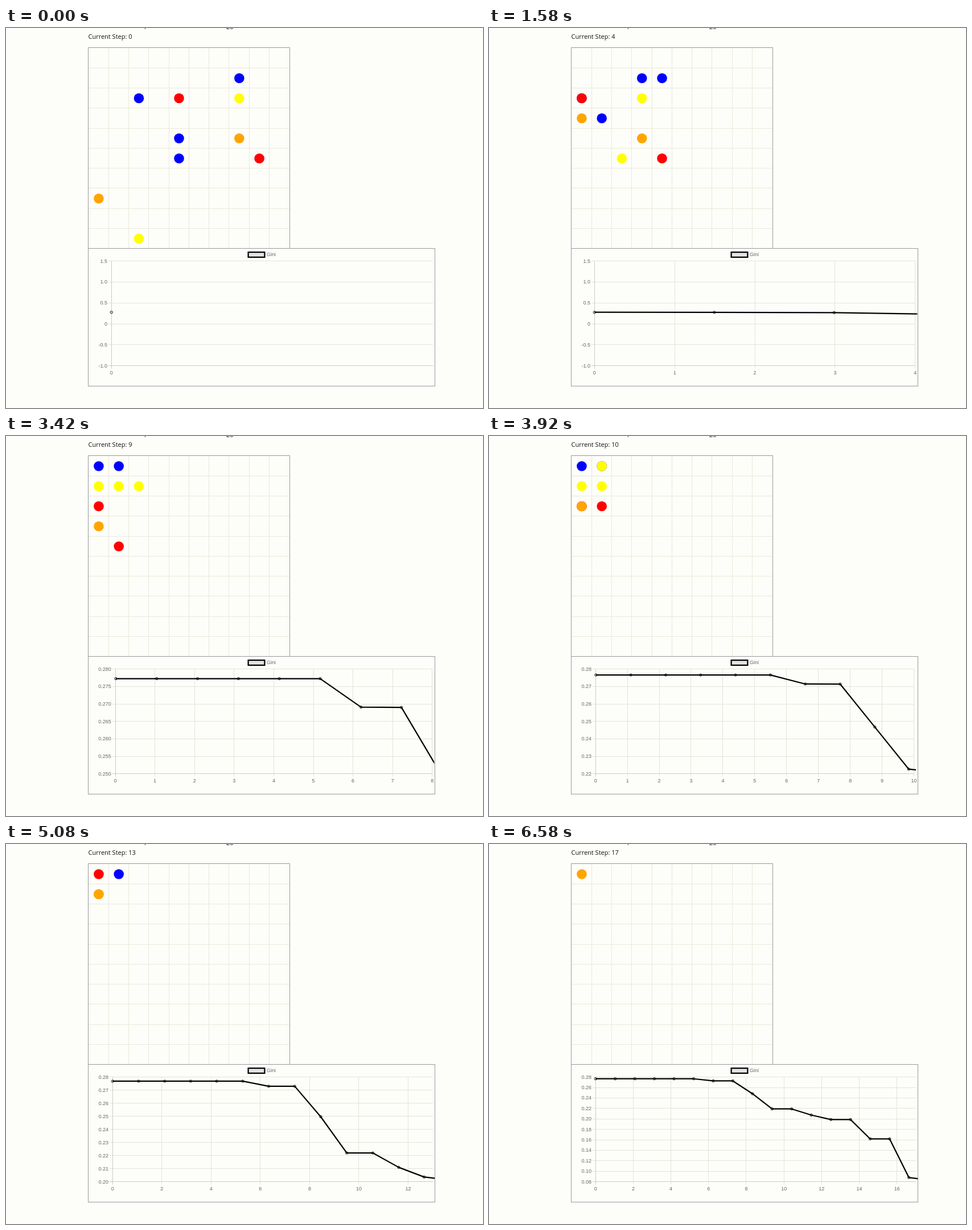
Write an HTML page with a canvas that moves like this. It is 838x668 px and loops after 6660 ms.

```html
<!DOCTYPE html>
<html>
<head>
<meta charset="utf-8">
<style>
  html, body { margin: 0; width: 100%; height: 100%; overflow: hidden; background: #fdfdf9; }
  canvas { display: block; }
</style>
</head>
<body>
<canvas id="stage" width="838" height="668"></canvas>
<script>
const ctx = document.getElementById('stage').getContext('2d');
const LOOP = 6660, FIRST = 420, STEP = 375, LAST = 17;
const DRAW_DELAY = 8, EASE_DELAY = 20, EASE_TIME = 1000;
const TOP = 409.7, BOTTOM = 593.7;

const gini = [.2769, .2769, .2769, .2769, .2769, .2769, .2731, .2731, .2502,
  .223, .223, .212, .204, .204, .1693, .1693, .0889, .0889];

// Cell (column, row) of each agent at the key steps; a shorter path leaves the board early.
const KEYS = [0, 4, 6, 8, 11, 14, 17];
const agents = [
  ['blue yellow', '22 02 12 11'],
  ['blue', '44 13 01'],
  ['blue', '71 31 11 00'],
  ['yellow', '72 32 12 01'],
  ['blue', '45 41 21 10 10'],
  ['orange', '07 03 02 02 02 01 00'],
  ['red', '42 02 02 02'],
  ['yellow', '29 25 23 21 00'],
  ['orange', '74 34 14 03 01'],
  ['red', '85 45 25 14 11 00']
].map(([colors, path]) => ({
  colors: colors.split(' '),
  path: path.split(' ').map(p => [+p[0], +p[1]])
}));

function line(x1, y1, x2, y2, color) {
  ctx.strokeStyle = color;
  ctx.lineWidth = 1;
  ctx.beginPath();
  ctx.moveTo(x1, y1);
  ctx.lineTo(x2, y2);
  ctx.stroke();
}

function text(str, x, y, align = 'left', font = '9px "Liberation Sans", Arial, sans-serif', color = '#666') {
  ctx.font = font;
  ctx.fillStyle = color;
  ctx.textAlign = align;
  ctx.fillText(str, x, y);
}

function niceCeil(range) {
  const unit = 10 ** Math.floor(Math.log10(range));
  return unit * [1, 2, 5, 10].find(m => range / unit <= m);
}

function axisFor(n) {
  const values = gini.slice(0, n + 1);
  let min = Math.min(...values), max = Math.max(...values);
  if (min === max) { min -= 1; max += 1.0001; }
  const tick = niceCeil(max - min) / 10;
  const first = Math.floor(min / tick), last = Math.ceil(max / tick);
  const digits = -Math.floor(Math.log10(tick) + 1e-9);
  const skip = n > 10 ? 2 : 1;
  const left = [0, 185.3, 187.2, 192, 197][digits];
  const right = n === 0 || n % skip ? 749.8 : n > 9 ? 746.5 : 748.8;
  const y = v => BOTTOM - (v / tick - first) / (last - first) * (BOTTOM - TOP);
  return { n, tick, first, last, digits, skip, left, right, y,
    gap: (right - left) / Math.max(n, 1), base: y(Math.max(first * tick, 0)) };
}

const axes = gini.map((_, n) => axisFor(n));

function moveTowards(points, axis, elapsed) {
  const rest = (1 - Math.max(0, elapsed - EASE_DELAY) / EASE_TIME) ** 4;
  return points.map(([x, y], i) => {
    const tx = axis.left + i * axis.gap, ty = axis.y(gini[i]);
    return [tx + (x - tx) * rest, ty + (y - ty) * rest];
  });
}

// Every step restarts the easing from wherever the points are.
function pointsAt(n, elapsed) {
  let points = [[axes[0].left, axes[0].y(gini[0])]];
  for (let k = 1; k <= n; k++) {
    const old = axes[k - 1];
    points.push([old.left + k * old.gap, old.base]);
    points = moveTowards(points, axes[k], k < n ? STEP : elapsed);
  }
  return points;
}

function drawBoard(step) {
  const cell = 35.27, x0 = 145.3, y0 = 35.3;
  for (let i = 1; i < 10; i++) {
    const p = Math.floor(i * cell) + .5;
    line(145 + p, 35, 145 + p, 387, '#eaeadc');
    line(145, 35 + p, 498, 35 + p, '#eaeadc');
  }
  ctx.strokeStyle = '#9a9aa2';
  ctx.strokeRect(144.5, 34.5, 354, 353);

  const k = KEYS.findLastIndex(key => key <= step);
  for (const { colors, path } of agents) {
    const from = path[k];
    if (!from) continue;
    const to = path[k + 1] || from;
    const f = (step - KEYS[k]) / ((KEYS[k + 1] || LAST + 1) - KEYS[k]);
    const [col, row] = from.map((a, i) => Math.round(a + (to[i] - a) * f));
    ctx.fillStyle = step > 6 ? colors[colors.length - 1] : colors[0];
    ctx.beginPath();
    ctx.arc(x0 + (col + .5) * cell, y0 + (row + .5) * cell, 8.8, 0, 7);
    ctx.fill();
  }
}

function drawChart(n, elapsed) {
  const axis = axes[n], { left, right } = axis;
  const soft = '#e4e4de', strong = '#cacac6';
  ctx.lineWidth = 1;
  ctx.strokeStyle = '#9a9aa2';
  ctx.strokeRect(144.5, 387.5, 609, 242);

  ctx.fillStyle = '#e3e3e1';
  ctx.fillRect(425.5, 394, 29, 9);
  ctx.strokeStyle = '#000';
  ctx.lineWidth = 2.25;
  ctx.strokeRect(425.6, 394.1, 28.8, 8.8);
  text('Gini', 458, 401);

  for (let i = axis.first; i <= axis.last; i++) {
    const y = axis.y(i * axis.tick), py = Math.floor(y) + .5;
    line(left - 5, py, right, py, i === axis.first ? strong : soft);
    text(i ? (i * axis.tick).toFixed(axis.digits) : '0', left - 7.2, y + 2.8, 'right');
  }
  for (let i = 0; i <= n; i += axis.skip) {
    const x = left + i * axis.gap, px = Math.floor(x) + .5;
    line(px, TOP, px, BOTTOM + 5, i ? soft : strong);
    text(i, x, 609, 'center');
  }

  const points = pointsAt(n, elapsed);
  ctx.save();
  ctx.beginPath();
  ctx.rect(left - 3.5, TOP - 3, right - left + 7, BOTTOM - TOP + 6);
  ctx.clip();
  ctx.strokeStyle = '#000';
  ctx.lineWidth = 2.25;
  ctx.lineJoin = 'round';
  ctx.beginPath();
  points.forEach(p => ctx.lineTo(...p));
  ctx.stroke();
  ctx.restore();

  ctx.fillStyle = 'rgba(0,0,0,.1)';
  ctx.strokeStyle = '#000';
  ctx.lineWidth = .8;
  for (const [x, y] of points) {
    if (x < left - 3 || x > right + 3) continue;
    ctx.beginPath();
    ctx.arc(x, y, 2.2, 0, 7);
    ctx.fill();
    ctx.stroke();
  }
}

// The picture advances twelve times a second: 80, 80, 90 ms.
function heldTime(t) {
  if (t < FIRST) return 0;
  const e = t - FIRST, rem = e % 250;
  return FIRST + e - rem + 80 * Math.min(2, Math.floor(rem / 80));
}

const stepAt = t => t < FIRST ? 0 : Math.min(LAST, Math.floor((t - FIRST) / STEP) + 1);

function draw(now) {
  const t = heldTime(now % LOOP);
  const label = '11px "Open Sans", "Noto Sans", sans-serif';
  ctx.fillStyle = '#fdfdf9';
  ctx.fillRect(0, 0, 838, 668);
  text('p', 243, -1, 'left', label, '#222');
  text('20', 387, 2, 'left', label, '#222');
  text('Current Step: ' + stepAt(t), 144.5, 19, 'left', label, '#111');

  const n = stepAt(t - DRAW_DELAY);
  drawBoard(n);
  drawChart(n, t - DRAW_DELAY - FIRST - (n - 1) * STEP);
}

function loop() {
  draw(performance.now());
  requestAnimationFrame(loop);
}
loop();
</script>
</body>
</html>
```
